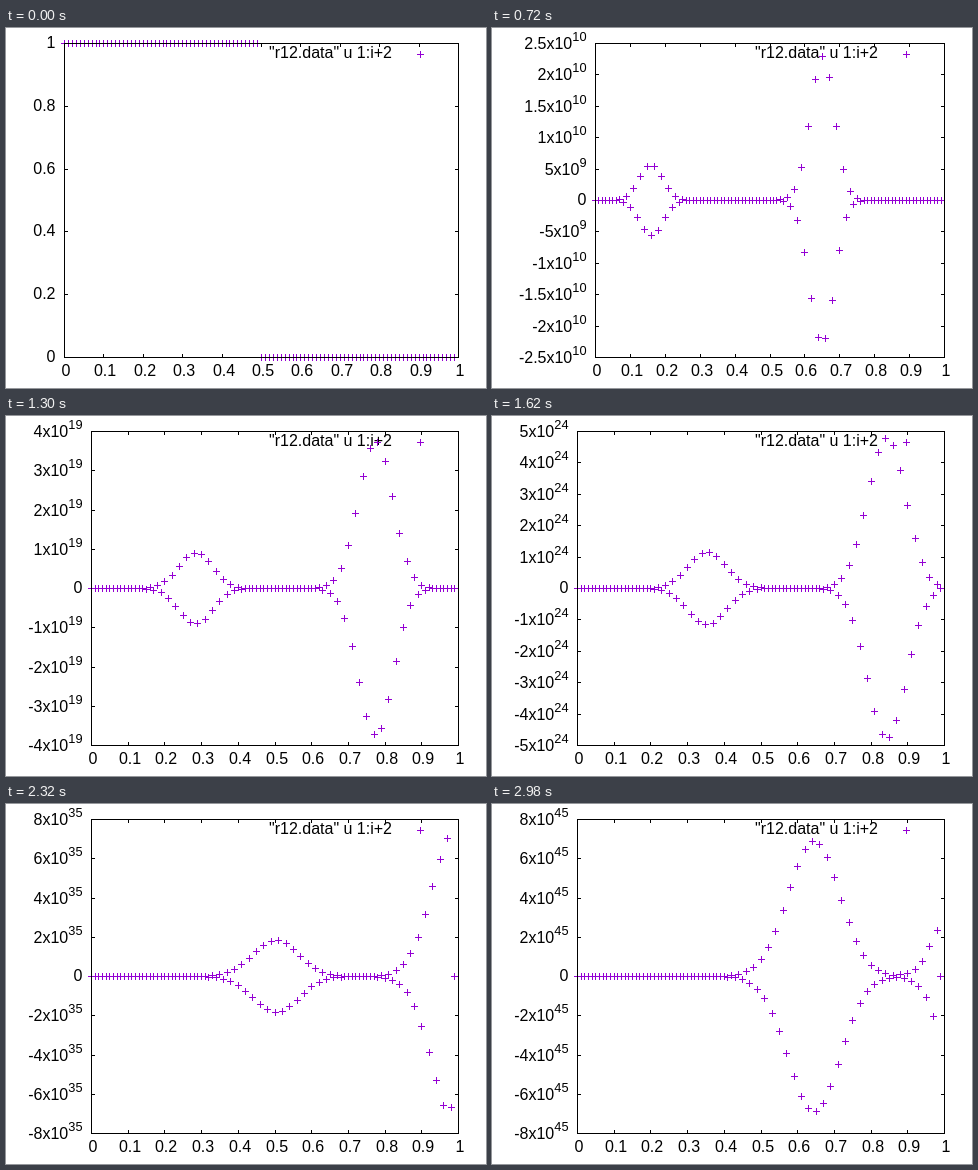
Animation of 480x360 px, one loop 3 s. Source, as an HTML page with a canvas:

```html
<!DOCTYPE html>
<html>
<head>
<meta charset="utf-8">
<style>
html, body { margin: 0; width: 100%; height: 100%; overflow: hidden; background: #fff; }
canvas { display: block; }
</style>
</head>
<body>
<canvas id="stage" width="480" height="360"></canvas>
<script>
const ctx = document.getElementById('stage').getContext('2d');
const STEPS = 150, STEP_MS = 20, COUNT = 100;
const TOP = 15, RIGHT = 452, BOTTOM = 329, TIC = 4;
const FAMILY = '"Liberation Sans", Arial, sans-serif';

// Unstable three-point scheme on a step, with both end values held fixed
const states = [Array.from({ length: COUNT }, (_, j) => j < COUNT / 2 ? 1 : 0)];
while (states.length < STEPS) {
  const u = states[states.length - 1];
  states.push(u.map((v, j) =>
    j === 0 || j === COUNT - 1 ? v : u[j - 1] - v + 0.1 * u[j + 1]));
}

function ticStep(range) {
  const power = 10 ** Math.floor(Math.log10(range));
  const slots = 20 * power / range;
  const size = slots > 10 ? 0.2 : slots > 4 ? 0.5 : slots > 2 ? 1 : 2;
  return size * power;
}

function label(value) {
  const [mantissa, exponent] = value.toExponential(5).split('e');
  return Math.abs(value) < 999999.5
    ? { base: String(+value.toPrecision(6)), sup: '' }
    : { base: +mantissa + 'x10', sup: String(+exponent) };
}

// Character estimate; positive numbers keep a blank for the sign
function labelChars({ base, sup }) {
  return Math.ceil(base.length + (base[0] === '-' ? 0 : 1) + 0.8 * sup.length);
}

function text(str, x, y, align, size = 16) {
  ctx.font = size + 'px ' + FAMILY;
  ctx.textAlign = align;
  ctx.fillText(str, x, y);
  return ctx.measureText(str).width;
}

function plus(x, y) {
  x = Math.round(x);
  y = Math.round(y);
  ctx.fillRect(x - 3, y, 7, 1);
  ctx.fillRect(x, y - 3, 1, 7);
}

function draw(u) {
  const low = Math.min(...u), high = Math.max(...u);
  const tic = ticStep(high - low);
  const first = Math.floor(low / tic + 1e-9), last = Math.ceil(high / tic - 1e-9);
  const tics = [];
  for (let k = first; k <= last; k++) tics.push({ k, ...label(k * tic) });

  const left = 22 + 9 * Math.max(...tics.map(labelChars));
  const px = x => left + x * (RIGHT - left);
  const py = k => BOTTOM - (k - first) / (last - first) * (BOTTOM - TOP);

  ctx.fillStyle = '#fff';
  ctx.fillRect(0, 0, 480, 360);
  ctx.fillStyle = '#000';

  for (const { k, base, sup } of tics) {
    const y = Math.round(py(k)), edge = left - 8.5;
    ctx.fillRect(left, y, TIC, 1);
    ctx.fillRect(RIGHT - TIC + 1, y, TIC, 1);
    if (sup) {
      const width = text(sup, edge, y - 2, 'right', 12.8);
      text(base, edge - width, y + 6, 'right');
    } else {
      text(base, edge, y + 5, 'right');
    }
  }
  for (let i = 0; i <= 10; i++) {
    const x = Math.round(px(i / 10));
    ctx.fillRect(x, TOP, 1, TIC);
    ctx.fillRect(x, BOTTOM - TIC + 1, 1, TIC);
    text(String(i / 10), x + 2, 348, 'center');
  }
  text('"r12.data" u 1:i+2', 386, 30, 'right');

  ctx.fillStyle = '#9400d3';
  plus(414, 26);
  u.forEach((v, j) => plus(px(j / COUNT), py(v / tic)));

  // The border lies over the points
  ctx.strokeStyle = '#000';
  ctx.strokeRect(left + 0.5, TOP + 0.5, RIGHT - left, BOTTOM - TOP);
}

function frame() {
  draw(states[Math.floor(performance.now() / STEP_MS) % STEPS]);
  requestAnimationFrame(frame);
}
frame();
</script>
</body>
</html>
```
